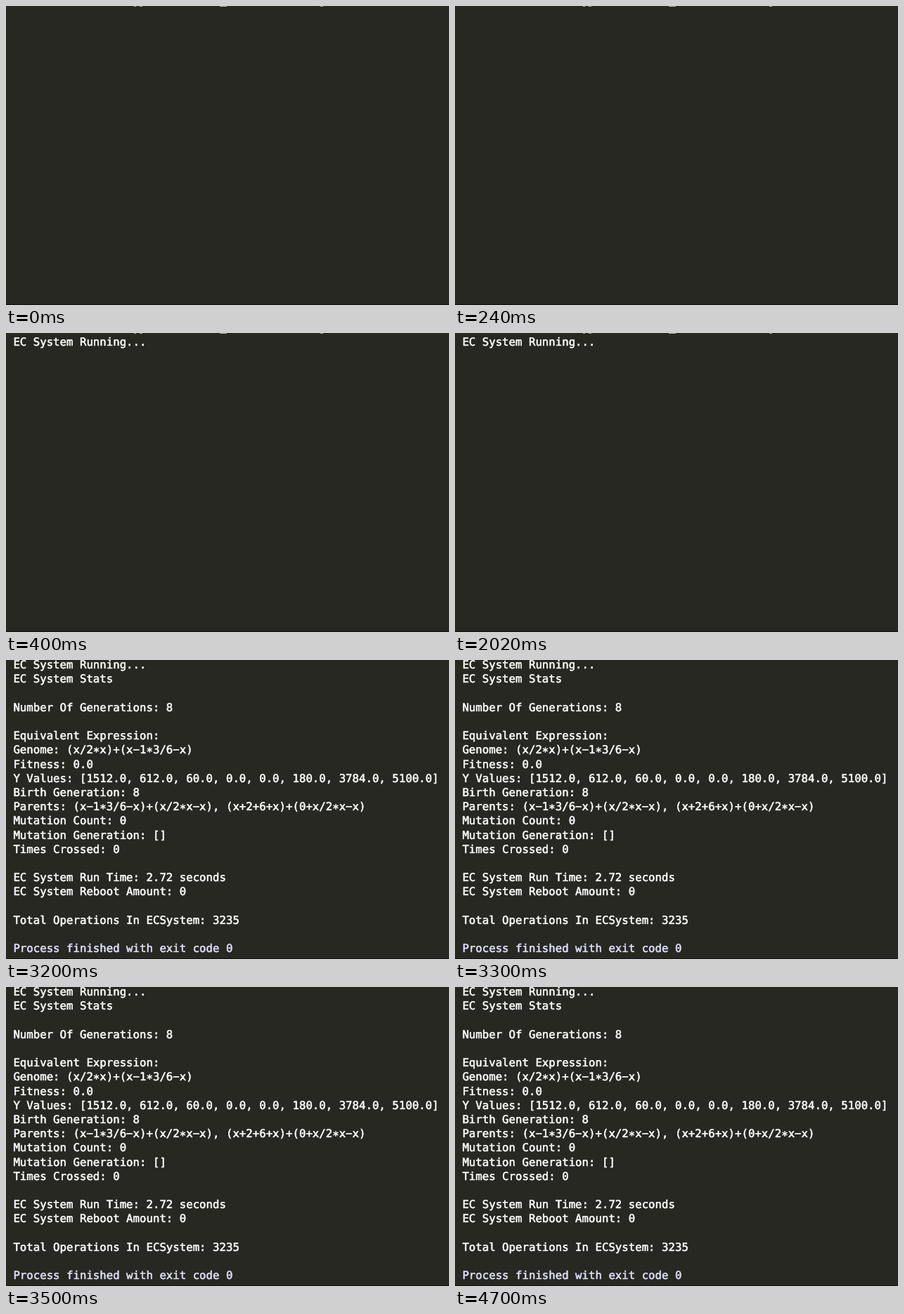
Write an HTML page with a canvas that moves like this. It is 630 px wide and 426 px high and loops after 5500 ms.

```html
<!DOCTYPE html>
<html lang="en">
<head>
<meta charset="utf-8">
<title>EC System run</title>
<style>
  html, body { margin: 0; width: 100%; height: 100%; overflow: hidden; background: #272822; }
  canvas { display: block; }
</style>
</head>
<body>
<canvas id="stage" width="630" height="426"></canvas>
<script>
const ctx = document.getElementById('stage').getContext('2d');
const LOOP = 5500, START = 400, REPORT = 3100;
const LEFT = 10.4, PITCH = 20.2;
const WHITE = '#ffffff', LILAC = '#e2e1fb';

const report = `EC System Running...
EC System Stats

Number Of Generations: 8

Equivalent Expression:
Genome: (x/2*x)+(x-1*3/6-x)
Fitness: 0.0
Y Values: [1512.0, 612.0, 60.0, 0.0, 0.0, 180.0, 3784.0, 5100.0]
Birth Generation: 8
Parents: (x-1*3/6-x)+(x/2*x-x), (x+2+6+x)+(0+x/2*x-x)
Mutation Count: 0
Mutation Generation: []
Times Crossed: 0

EC System Run Time: 2.72 seconds
EC System Reboot Amount: 0

Total Operations In ECSystem: 3235

Process finished with exit code 0`
  .replace(/-/g, '\u2212')   // wide minus and centred asterisk
  .replace(/\*/g, '\u2217')
  .split('\n');

// A thin outline gives the text its medium weight
function print(text, y, color) {
  ctx.fillStyle = ctx.strokeStyle = color;
  ctx.fillText(text, LEFT, y);
  ctx.strokeText(text, LEFT, y);
}

// Descender tips of the line scrolled off the top
function drawTips() {
  ctx.fillStyle = '#b4b4ae';
  for (const [x, w] of [[182, 3], [190, 4], [304, 10], [447, 4]]) ctx.fillRect(x, 0, w, 1);
}

function draw(t) {
  ctx.fillStyle = '#272822';
  ctx.fillRect(0, 0, 630, 426);
  ctx.fillStyle = '#170d10';
  ctx.fillRect(0, 425, 630, 1);

  ctx.font = '15.71px "DejaVu Sans Mono", monospace';
  ctx.textRendering = 'geometricPrecision';
  ctx.lineWidth = 0.55;
  ctx.lineJoin = 'round';
  if (t < REPORT) {
    drawTips();
    if (t >= START) print(report[0], 17.6, WHITE);
  } else {
    report.forEach((line, i) =>
      print(line, 12.2 + i * PITCH, i === report.length - 1 ? LILAC : WHITE));
  }
}

const origin = performance.now();
function tick() {
  draw((performance.now() - origin) % LOOP);
  requestAnimationFrame(tick);
}
tick();
</script>
</body>
</html>
```
